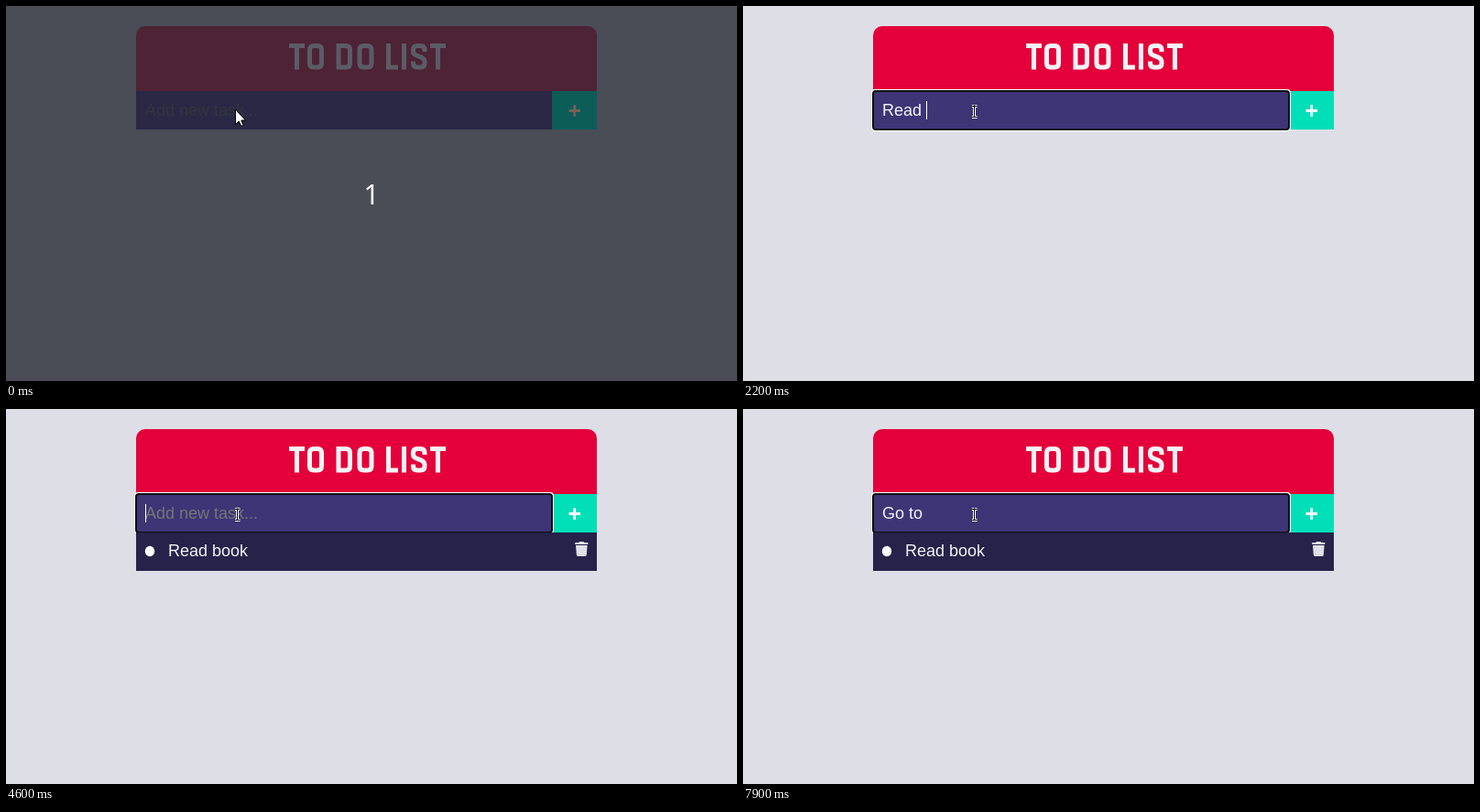
An HTML page for the animation above (8000 ms loop, 798 px wide and 410 px high).

```html
<!DOCTYPE html>
<html lang="en">
<head>
<meta charset="utf-8">
<title>To do list</title>
<style>
html, body { margin: 0; width: 100%; height: 100%; overflow: hidden; background: #dedfe6; }
#stage { position: relative; width: 798px; height: 410px; overflow: hidden; background: var(--bg);
  --bg: #dedfe6; --head: #e4003a; --field: #3d3576; --btn: #00dfb7; --title: #f2f3f5; --hint: #757575; --plus: #fff;
  font: 18px/20px "Liberation Sans", Arial, sans-serif; color: #f4f4f8; }
#stage.dim { --bg: #4a4d56; --head: #4e2336; --field: #2a2845; --btn: #0c5c58; --title: #5b5c65; --hint: #34343f; --plus: #75605a; }
#stage > * { position: absolute; white-space: pre; }
header { left: 142px; top: 22px; width: 503px; height: 71px; border-radius: 10px 10px 0 0; background: var(--head); }
h1 { margin: 0; left: 309px; top: 33px; font: bold 32px/44px "Liberation Sans", sans-serif; color: transparent; }
#field { left: 142px; top: 93px; width: 454px; height: 42px; background: var(--field); }
#field.focus { outline: auto 1px -webkit-focus-ring-color; }
#btn { left: 596px; top: 93px; width: 49px; height: 42px; background: var(--btn); }
#typed, #hint { left: 152px; top: 104px; }
#hint { color: var(--hint); }
#caret { top: 104px; width: 1px; height: 20px; background: #fff; }
#item { left: 142px; top: 135px; width: 503px; height: 42px; background: #26224a; }
#item span { position: absolute; left: 35px; top: 10px; }
#item svg { position: absolute; left: 0; top: 0; }
#art { left: 0; top: 0; }
#count { left: 0; width: 798px; top: 185px; text-align: center; font: 30px/41px "Noto Sans", "Open Sans", sans-serif; color: #fff; }
#edge { left: 0; top: 407px; width: 798px; height: 3px; background: #504758; }
</style>
</head>
<body>
<div id="stage">
  <header></header>
  <h1>TO DO LIST</h1>
  <div id="btn"></div>
  <div id="field"></div>
  <div id="item">
    <svg width="503" height="42" fill="#dfe0e6">
      <ellipse cx="15" cy="20.5" rx="5.2" ry="5.7" fill="#fff"/>
      <rect x="479" y="11" width="14.5" height="2" rx="1"/>
      <path d="M483 11.2L484 10H488.5L489.5 11.2zM480 14H492.6L491.8 24.6Q491.7 26 490.3 26H482.3Q480.9 26 480.8 24.6z"/>
    </svg>
    <span>Read book</span>
  </div>
  <div id="hint">Add new task...</div>
  <div id="typed"></div>
  <div id="caret"></div>
  <svg id="art" width="798" height="410" fill="none">
    <g stroke="var(--title)" stroke-width="5">
      <path id="tee" d="M309 43.5H326M317.5 43.5V69.5"/>
      <path id="oh" d="M336 43.5H340Q344.5 43.5 344.5 48V62.5Q344.5 67 340 67H336Q331.5 67 331.5 62.5V48Q331.5 43.5 336 43.5z"/>
      <path d="M363 43.5H371Q375.5 43.5 375.5 48V62.5Q375.5 67 371 67H363z"/>
      <use href="#oh" x="54.5"/>
      <path d="M417.5 41V67H428M434.5 41V69.5"/>
      <path d="M457 50V48Q457 43.5 452.5 43.5H449Q444.5 43.5 444.5 48V49.5Q444.5 52.5 447.5 53.7L454 56.4Q457 57.8 457 61V62.5Q457 67 452.5 67H449Q444.5 67 444.5 62.5V60.5"/>
      <use href="#tee" x="154"/>
    </g>
    <path d="M614.5 114.5H627M620.7 108.2V120.8" stroke="var(--plus)" stroke-width="2.8"/>
    <g id="beam">
      <path id="bar" d="M250 109.5H252M253 109.5H255.5M252.5 109V121.5M250 121.5H255.5" stroke="#fff" stroke-width="3"/>
      <path d="M250 109.5H255.5M252.5 109V122M250 121.5H255.5" stroke="#000"/>
    </g>
    <path id="arrow" d="M250.5 113V129.5L254.3 126L256.8 131.5L259.2 130.4L256.8 125H261.5z" fill="#fff" stroke="#000"/>
  </svg>
  <div id="edge"></div>
  <div id="count">1</div>
</div>
<script>
const LOOP = 8000;
// time, text, caret: offset in px measured from text (true), hidden (false)
const steps = [
  [0, "", false], [700, "", true], [1200, "", false],
  [1400, "R", true], [1600, "Re", true], [1800, "Rea", true], [2000, "Read", true], [2200, "Read ", true],
  [2600, "Read b", true], [2900, "Read bo", true], [3100, "Read boo", true], [3300, "Read book", true],
  [3700, "", true], [4000, "", false], [4600, "", true],
  [5200, "G", true], [5400, "Go", true], [5600, "Go ", true], [5900, "Go t", true], [6100, "Go to", true],
  [6400, "Go to ", true], [6500, "Go to c", true], [6700, "Go to cou", true], [6800, "Go to cour", true],
  [7400, "Go to cour", false], [7700, "Go to co", false], [7900, "Go to", false]
];
const $ = id => document.getElementById(id);
const show = (id, on) => { $(id).style.display = on ? "" : "none"; };

function draw(t) {
  const [, text, caret] = steps.findLast(s => s[0] <= t);
  const intro = t < 100;
  $("stage").classList.toggle("dim", intro);
  $("field").classList.toggle("focus", t >= 700);
  $("typed").textContent = text;
  $("caret").style.left = 152 + Math.floor($("typed").getBoundingClientRect().width) + "px";
  show("caret", caret);
  show("hint", !text);
  show("item", t >= 3700);
  for (const id of ["arrow", "count", "edge"]) show(id, intro);
  show("beam", !intro);
}

const start = performance.now();
function tick() {
  draw((performance.now() - start) % LOOP);
  requestAnimationFrame(tick);
}
tick();
</script>
</body>
</html>
```
